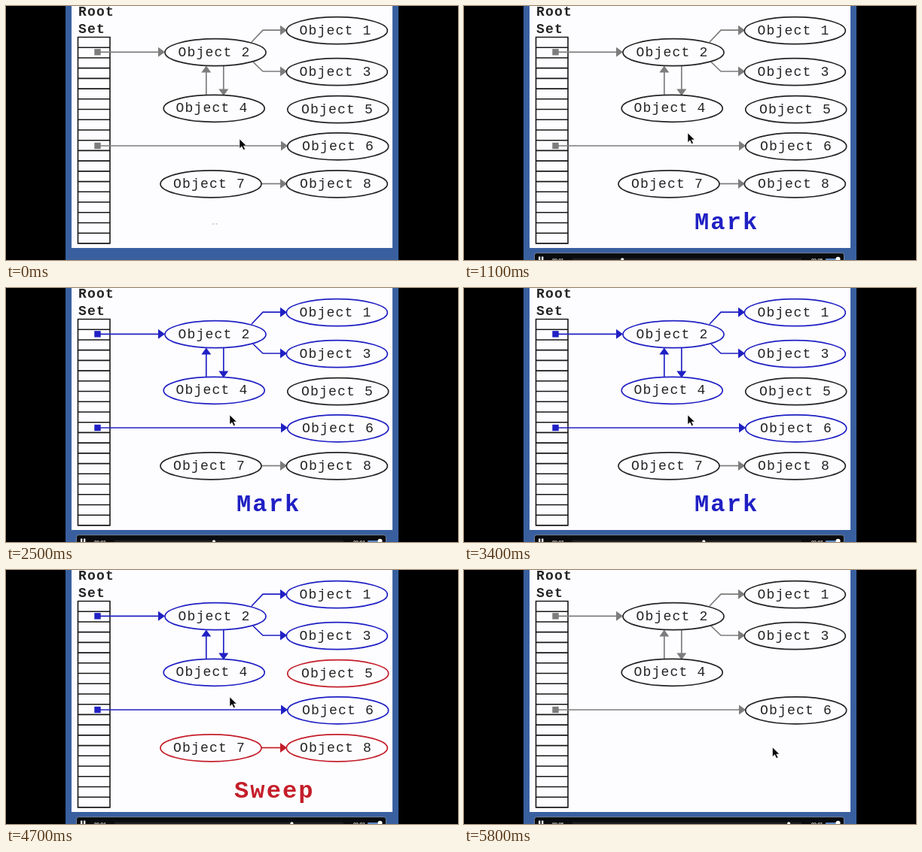
Write an HTML page that moves like this. It is 600 by 338 pixels and loops after 5.9 s.

```html
<!DOCTYPE html>
<html lang="en">
<head>
<meta charset="utf-8">
<title>Mark and sweep</title>
<style>
  html, body { margin: 0; width: 100%; height: 100%; overflow: hidden; background: #000; }
  svg { display: block; width: 100vw; height: 100vh; }
  text { font-family: "Liberation Mono", "Courier New", monospace; font-size: 18px; letter-spacing: .066em; fill: #242424; white-space: pre; }
  .bold { font-weight: bold; }
  .title { font-weight: bold; font-size: 32px; }
  .small { font: bold 6px "Liberation Sans", Arial, sans-serif; letter-spacing: 0; fill: #ddd; }
  .scene { filter: blur(.45px); }
</style>
</head>
<body>
<svg id="stage" viewBox="0 0 600 338"></svg>
<script>
const LOOP = 5900, STEP = 100;
const GRAY = '#7c7c7c', BLACK = '#242424', BLUE = '#2020c4', RED = '#c41e2a';
const AT = { bar: 200, mark: 1000, roots: 1500, settle: 1900, children: 2200, sweep: 3800, remove: 4800, reset: 5400 };

function set(el, attrs) {
  for (const key in attrs) el.setAttribute(key, attrs[key]);
}
function add(tag, attrs, parent = scene, content) {
  const el = document.createElementNS('http://www.w3.org/2000/svg', tag);
  set(el, attrs);
  if (content !== undefined) el.textContent = content;
  return parent.appendChild(el);
}
function show(el, visible) {
  el.setAttribute('visibility', visible ? 'visible' : 'hidden');
}
const scene = add('g', { class: 'scene' }, document.getElementById('stage'));
const rect = (x, y, width, height, fill, parent) => add('rect', { x, y, width, height, fill }, parent);
const label = (x, y, content, attrs = {}, parent) => add('text', { x, y, ...attrs }, parent, content);

// Backdrop, reaching past the stage so that its edges stay crisp
rect(-10, -10, 620, 358, '#000');
rect(79, -10, 442, 358, '#395f9f');
rect(87, -10, 426, 332, '#fdfdff');

// Root set table
label(96, 12.5, 'Root', { class: 'bold' });
label(96, 35.5, 'Set', { class: 'bold' });
const ROWS = 20, TOP = 41.5, ROW = 13.72;
let grid = `M95.5 ${TOP}V${TOP + ROWS * ROW}M138 ${TOP}V${TOP + ROWS * ROW}`;
for (let i = 0; i <= ROWS; i++) grid += `M94.8 ${TOP + i * ROW}H138.7`;
add('path', { d: grid, fill: 'none', stroke: '#181818', 'stroke-width': 1.6 });

// Links between cells and objects
function makeLink(group, d, tipX, tipY, angle, square) {
  const g = add('g', {});
  const line = add('path', { d, fill: 'none' }, g);
  add('path', { d: 'M0 0L-9 -6.5V6.5Z', stroke: 'none', transform: `translate(${tipX} ${tipY}) rotate(${angle})` }, g);
  if (square) add('rect', { x: 117.3, y: tipY - 4.2, width: 8.4, height: 8.4, stroke: 'none' }, g);
  return { group, g, line };
}
const links = [
  makeLink('root', 'M121 61.3H205', 211, 61.3, 0, true),
  makeLink('root', 'M121 186H367', 374, 186, 0, true),
  makeLink('child', 'M326 48L341 32.2H366', 373, 32.2, 0),
  makeLink('child', 'M328 74.5L341 87H366', 373, 87, 0),
  makeLink('child', 'M265.8 119V86', 265.8, 79.5, -90),
  makeLink('child', 'M288.8 80V113', 288.8, 119.5, 90),
  makeLink('lost', 'M339 236.5H366', 373, 236.5, 0)
];

// Objects: number, group, centre, text start
const objects = [
  [1, 'child', 439.3, 32.7, 389.5],
  [2, 'root', 278, 61.7, 228.5],
  [3, 'child', 439.3, 87.7, 389.5],
  [4, 'child', 276.2, 136.3, 225.5],
  [5, 'lost', 440.7, 137.7, 392],
  [6, 'root', 440.7, 186.8, 393],
  [7, 'lost', 272, 236.8, 222],
  [8, 'lost', 439.3, 236.8, 390]
].map(([n, group, cx, cy, x]) => {
  const g = add('g', {});
  const ring = add('ellipse', { cx, cy, rx: 67, ry: 18, fill: 'none', 'stroke-width': 1.7 }, g);
  label(x, cy + 4.8, 'Object ' + n, {}, g);
  return { group, g, ring };
});

const dots = add('path', { d: 'M274 290h2M278.5 290h2', stroke: '#c0c0c4', 'stroke-width': 1.5 });
const mark = label(306, 297, 'Mark', { class: 'title', style: `fill:${BLUE}` });
const sweep = label(303, 302.5, 'Sweep', { class: 'title', style: `fill:${RED}` });

// Player controls
const bar = add('g', {});
add('rect', { x: 93.5, y: 328.7, width: 411, height: 20, rx: 3, fill: '#0a0b0e', stroke: '#76849c' }, bar);
rect(99, 333.5, 2.4, 6, '#eee', bar);
rect(103, 333.5, 2.4, 6, '#eee', bar);
const elapsed = label(117, 339.5, '', { class: 'small' }, bar);
const remaining = label(459, 339.5, '', { class: 'small' }, bar);
rect(144, 335.5, 304, 3, '#1c1e22', bar);
const knob = add('circle', { cy: 337.3, r: 2, fill: '#f4f4f4' }, bar);
rect(480, 336, 14, 2, '#5d86c4', bar);
add('circle', { cx: 496.5, cy: 336.8, r: 3, fill: '#fff' }, bar);

const cursor = add('path', {
  d: 'M0 0V12.5L3 9.8L5.2 14.5L7.4 13.5L5.2 9H9.2Z',
  fill: '#080808', stroke: '#fff', 'stroke-width': .5
});

const lerp = (a, b, k) => a + (b - a) * k;
const progress = (t, from, to) => {
  const k = Math.min(1, Math.max(0, (t - from) / (to - from)));
  return k * k * (3 - 2 * k);
};
const clock = s => '00:' + String(s).padStart(2, '0');

function colorOf(group, t, idle) {
  if (t >= AT.reset) return idle;
  if (group === 'lost') return t >= AT.sweep ? RED : idle;
  return t >= (group === 'root' ? AT.roots : AT.children) ? BLUE : idle;
}

function draw(t) {
  const removed = t >= AT.remove;
  for (const { group, g, line } of links) {
    const color = colorOf(group, t, GRAY);
    const fresh = group === 'root' && t >= AT.roots && t < AT.settle;
    set(g, { fill: color, stroke: color });
    set(line, { 'stroke-width': fresh ? 2.2 : 1.7 });
    show(g, group !== 'lost' || !removed);
  }
  for (const { group, g, ring } of objects) {
    set(ring, { stroke: colorOf(group, t, BLACK) });
    show(g, group !== 'lost' || !removed);
  }
  show(dots, t < AT.mark);
  show(mark, t >= AT.mark && t < AT.sweep);
  show(sweep, t >= AT.sweep && t < AT.reset);

  show(bar, t >= AT.bar);
  set(knob, { cx: 182 + (t - 500) * .047 });
  elapsed.textContent = clock(Math.floor((t + 250) / 1000));
  remaining.textContent = '-' + clock(Math.min(5, Math.ceil((6170 - t) / 1000)));

  const first = progress(t, 0, 400), second = progress(t, 4700, 5200);
  const x = lerp(lerp(310, 297, first), 409.5, second);
  const y = lerp(lerp(177, 169, first), 236, second);
  set(cursor, { transform: `translate(${x} ${y})` });
}

const start = performance.now();
function tick() {
  const t = (performance.now() - start) % LOOP;
  draw(Math.floor(t / STEP) * STEP);
  requestAnimationFrame(tick);
}
tick();
</script>
</body>
</html>
```
